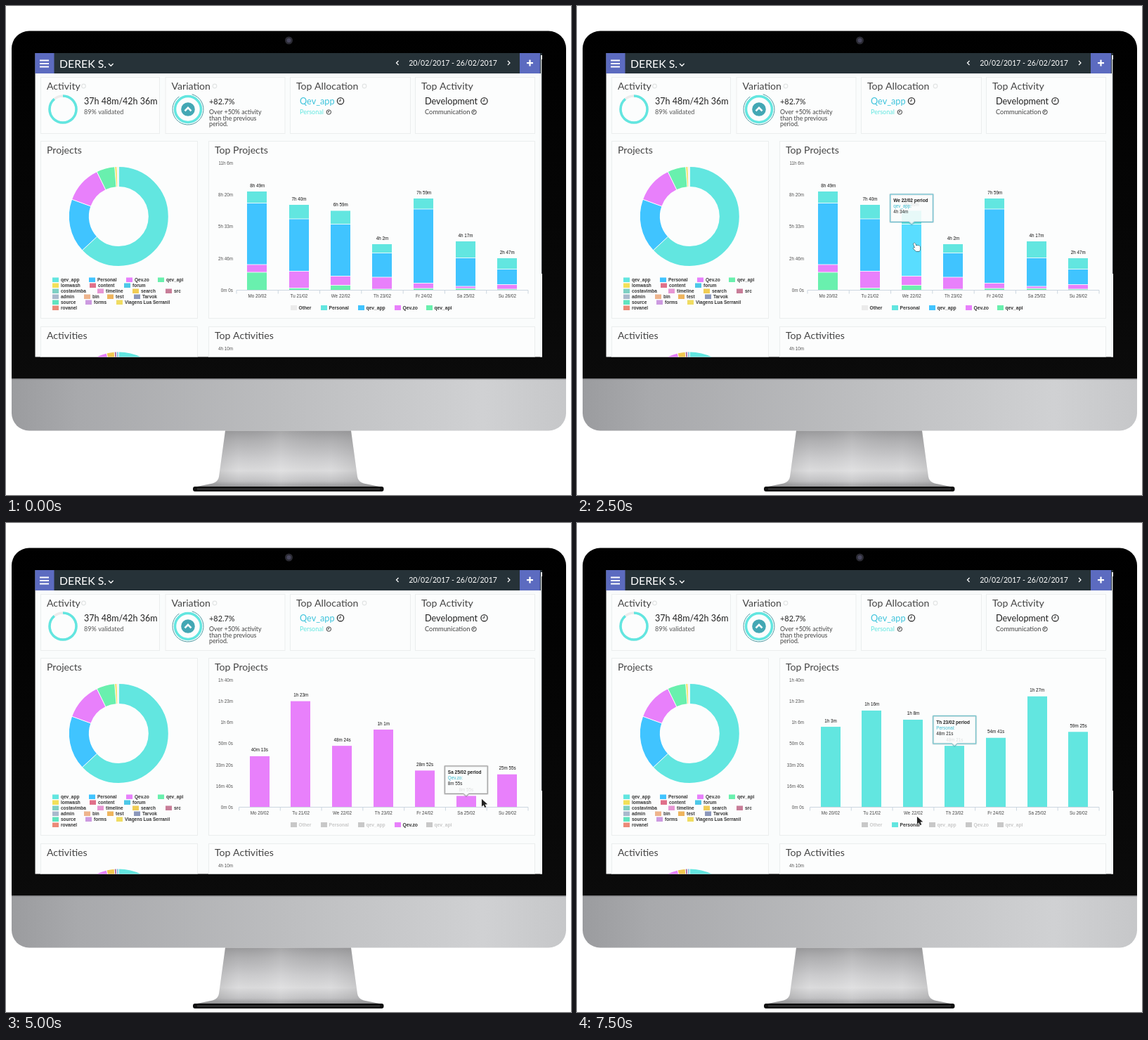
An HTML page with a canvas that plays this animation: 804 by 696 pixels, repeating every 8 s.

```html
<!DOCTYPE html>
<html lang="en">
<head>
<meta charset="utf-8">
<title>Activity dashboard</title>
<style>
html, body { margin: 0; width: 804px; height: 696px; overflow: hidden; background: #fff; }
canvas { display: block; }
</style>
</head>
<body>
<canvas id="stage" width="804" height="696"></canvas>
<script>
const c = document.getElementById('stage').getContext('2d');
const LATO = 'Lato, sans-serif', ARIAL = '"Liberation Sans", Arial, sans-serif';
const CYAN = '#62e6e0', BLUE = '#40c4ff', PINK = '#e880fb', GREEN = '#69f0ae', YELLOW = '#f2e05a';
const DAYS = ['Mo 20/02', 'Tu 21/02', 'We 22/02', 'Th 23/02', 'Fr 24/02', 'Sa 25/02', 'Su 26/02'];
const BASE = 404.5, RIGHT = 743;

// Stacked mode lists segment tops from the top down; single modes list minutes.
const MODES = {
  all: {
    left: 328, ticks: ['11h 6m', '8h 20m', '5h 33m', '2h 46m', '0m 0s'],
    colors: [CYAN, BLUE, PINK, GREEN],
    tops: [[264, 280.5, 368, 379], [283, 303, 377.5, 401.5], [291.5, 310.5, 384.5, 397.5],
      [339, 351.5, 386, 403], [274, 289, 394.5, 402], [335, 358.5, 399, 402], [359, 374.5, 396.5, 403]],
    labels: ['8h 49m', '7h 40m', '6h 59m', '4h 2m', '7h 59m', '4h 17m', '2h 47m'],
    series: 'qev_app', hover: 1, hot: '#59ddff', border: '#55bdd2'
  },
  site: single([40.2, 83.6, 48.4, 61.2, 28.9, 8.9, 25.9], PINK,
    ['40m 13s', '1h 23m', '48m 24s', '1h 1m', '28m 52s', '8m 55s', '25m 55s'], 'Qev.zo', '#ff99ff', '#999'),
  personal: single([63.4, 76.2, 69, 48.4, 54.7, 87.4, 59.4], CYAN,
    ['1h 3m', '1h 16m', '1h 8m', '48m 21s', '54m 41s', '1h 27m', '59m 25s'], 'Personal', '#7cfff8', '#55bdc8')
};

function single(minutes, color, labels, series, hot, border) {
  return {
    left: 331.5, ticks: ['1h 40m', '1h 23m', '1h 6m', '50m 0s', '33m 20s', '16m 40s', '0m 0s'],
    colors: [color], tops: minutes.map(m => [BASE - m * 1.805]), labels, series, hover: 0, hot, border
  };
}

// One pose per half second: cursor [kind, x, y], tooltip [day, value, alpha], hovered flag.
const POSES = [
  { mode: 'all' },
  { mode: 'all', cursor: ['arrow', 318, 428] },
  { mode: 'all', cursor: ['hand', 360, 342], tip: [0, '5h 24m'], hot: 1 },
  { mode: 'all', cursor: ['both', 422, 331], tip: [1, '4h 33m'], hot: 1 },
  { mode: 'all', cursor: ['arrow', 444, 336], tip: [1, '4h 33m'] },
  { mode: 'all', cursor: ['hand', 478, 337], tip: [2, '4h 34m'], hot: 1 },
  { mode: 'all', cursor: ['arrow', 508, 384], tip: [2, '4h 34m'] },
  { mode: 'site', cursor: ['hand', 576, 431], tip: [2, '4h 34m', 0.1] },
  { mode: 'site', cursor: ['arrow', 566, 408] },
  { mode: 'site', cursor: ['hand', 598, 376], tip: [4, '28m 52s'], hot: 1 },
  { mode: 'site', cursor: ['arrow', 677, 393], tip: [5, '8m 55s'] },
  { mode: 'site', cursor: ['hand', 576, 431] },
  { mode: 'personal', cursor: ['hand', 470, 431] },
  { mode: 'personal', cursor: ['both', 482, 384], tip: [2, '1h 8m'], hot: 1 },
  { mode: 'personal', cursor: ['hand', 537, 372], tip: [3, '48m 21s'], hot: 1 },
  { mode: 'personal', cursor: ['arrow', 484, 418], tip: [3, '48m 21s'] }
];

function text(s, x, y, size, color = '#333', align = 'left', face = LATO, weight = 400) {
  c.font = `${weight} ${size}px ${face}`;
  c.fillStyle = color;
  c.textAlign = align;
  c.fillText(s, x, y);
}

const small = (s, x, y, color, align) => text(s, x, y, 6.3, color, align, ARIAL);
const bold = (s, x, y, color, size = 6.5) => text(s, x, y, size, color, 'left', ARIAL, 700);

function box(x, y, w, h, color) {
  c.fillStyle = color;
  c.fillRect(x, y, w, h);
}

function line(points, color, width = 1) {
  c.beginPath();
  points.forEach(p => c.lineTo(...p));
  c.strokeStyle = color;
  c.lineWidth = width;
  c.stroke();
}

function ring(x, y, r, color, width, from = 0, to = 360) {
  const rad = a => (a - 90) * Math.PI / 180;
  c.beginPath();
  c.arc(x, y, r, rad(from), rad(to));
  c.strokeStyle = color;
  c.lineWidth = width;
  c.stroke();
}

function disc(x, y, r, color) {
  c.beginPath();
  c.arc(x, y, r, 0, 7);
  c.fillStyle = color;
  c.fill();
}

function gradient(x0, y0, x1, y1, ...stops) {
  const g = c.createLinearGradient(x0, y0, x1, y1);
  stops.forEach(([at, color]) => g.addColorStop(at, color));
  return g;
}

function donut(x, y, slices) {
  for (const [from, to, color] of slices) ring(x, y, 56.5, color, 28, from, to);
  for (const [from] of slices) {
    const a = from * Math.PI / 180, at = r => [x + r * Math.sin(a), y - r * Math.cos(a)];
    line([at(42), at(72)], '#fff');
  }
}

function monitor() {
  c.save();
  c.beginPath();
  c.roundRect(8, 35.5, 789, 569, 25);
  c.clip();
  box(8, 35, 789, 496, gradient(0, 35, 0, 530, [0, '#000'], [1, '#0b0b0b']));
  box(8, 530.5, 789, 75, gradient(8, 0, 797, 0, [0, '#9b9c9f'], [0.12, '#a8a9ac'], [0.5, '#bdbec0'], [0.85, '#d0d1d3'], [1, '#c6c7c9']));
  box(8, 530.5, 789, 1, '#85868a');
  c.restore();
  disc(402.5, 49, 5.5, '#2b2b33');
  disc(402.5, 49, 3, '#48475e');

  const stand = new Path2D('M312 604.5H491L500 670Q501 677 509 679.5L536 685H267L294 679.5Q302 677 303 670Z');
  c.fillStyle = gradient(0, 604, 0, 686, [0, '#99999b'], [0.18, '#b0b0b2'], [0.5, '#cdcdcf'], [0.7, '#dcdcdd'], [0.88, '#c2c2c4'], [1, '#8c8c8e']);
  c.fill(stand);
  c.fillStyle = gradient(300, 0, 503, 0, [0, '#7773'], [0.15, '#8880'], [0.45, '#fff2'], [0.8, '#8880'], [1, '#7773']);
  c.fill(stand);
  c.beginPath();
  c.roundRect(266, 684, 271.5, 7, 3);
  c.fillStyle = '#111';
  c.fill();
  box(272, 687, 260, 1, '#4a4a4c');
}

function header() {
  box(41, 67, 720, 29, '#263238');
  box(41, 67, 27.5, 29, '#5c6bc0');
  box(731, 67, 29, 29, '#5c6bc0');
  for (const y of [76.5, 81, 85.5]) box(48, y, 13, 2, '#fff');
  box(741, 80, 9, 2.2, '#fff');
  box(744.4, 76.6, 2.2, 9, '#fff');
  text('DEREK S.', 76, 87.5, 15.8, '#fff');
  line([[146, 82], [149.3, 85.3], [152.6, 82]], '#fff', 1.3);
  text('20/02/2017 - 26/02/2017', 636, 84.7, 10.5, '#fff', 'center');
  line([[558.5, 78], [555.5, 81], [558.5, 84]], '#fff', 1.2);
  line([[714, 78], [717, 81], [714, 84]], '#fff', 1.2);
}

function scrollbar() {
  box(760, 96, 3.5, 404, '#f4f6f6');
  box(761, 67, 2.5, 3, '#263238');
  box(761, 70, 2.5, 26, '#f4f6f6');
  box(762, 76, 1.5, 305, '#3c4145');
}

function clock(x, y, r) {
  ring(x, y, r, '#333', r / 3.4);
  line([[x, y - r * 0.6], [x, y], [x - r * 0.5, y]], '#333', 1);
}

function card(x, y, w, h, title, info) {
  box(x, y, w, h, '#fcfdfd');
  c.strokeStyle = '#ebeeee';
  c.lineWidth = 1;
  c.strokeRect(x + 0.5, y + 0.5, w, h);
  text(title, x + 9, y + (y < 150 ? 18 : 17.5), 14.1, '#444');
  if (info) ring(info, 114, 2.8, '#e2e5e5', 1.2);
}

function summary() {
  card(49, 101, 169, 80, 'Activity', 110.5);
  ring(81, 147, 19, '#ececec', 3.5);
  ring(81, 147, 19, CYAN, 3.5, 0, 320);
  text('37h 48m/42h 36m', 111, 139.5, 12.5, '#222');
  text('89% validated', 111, 154, 9.1, '#555');

  card(226.5, 101, 170, 80, 'Variation', 297);
  ring(259, 147, 22, '#4f9aa2', 1, 15, 325);
  ring(259, 147, 18.5, CYAN, 3.5);
  disc(259, 147, 9.8, '#43a7b4');
  line([[254.5, 149.3], [259, 144.8], [263.5, 149.3]], '#fff', 2.6);
  text('+82.7%', 289, 139.5, 10.9, '#222');
  ['Over +50% activity', 'than the previous', 'period.'].forEach((s, i) => text(s, 289, 154 + i * 8.5, 8.8, '#444'));

  card(404, 101, 171, 80, 'Top Allocation', 510);
  text('Qev_app', 418, 139.5, 12.7, '#3fc4dc');
  clock(476, 135.2, 4.6);
  text('Personal', 418, 154, 9, CYAN);
  clock(459.3, 151, 3.2);

  card(582, 101, 170, 80, 'Top Activity');
  text('Development', 596, 139.5, 12.7, '#222');
  clock(680.5, 135.2, 4.6);
  text('Communication', 596, 154, 9.3, '#444');
  clock(666, 151, 3.2);
}

function projects() {
  card(49, 192, 223, 252, 'Projects');
  donut(160.3, 299.5, [[0, 227, CYAN], [227, 290, BLUE], [290, 334, PINK], [334, 355.5, GREEN], [355.5, 358, YELLOW], [358, 360, '#f3eeee']]);
  const rows = [
    [[66, 'qev_app', CYAN], [118, 'Personal', BLUE], [171, 'Qev.zo', PINK], [216, 'qev_api', GREEN]],
    [[66, 'lomwash', YELLOW], [119, 'content', '#e0708a'], [168, 'forum', '#4cc8e8']],
    [[66, 'costavimba', '#7fd0c4'], [130, 'timeline', '#e796d4'], [180, 'search', '#f0cc55'], [227, 'src', '#c87d98']],
    [[66, 'admin', '#a9b9cc'], [111, 'bin', '#eeb48c'], [144, 'test', '#efb45c'], [182, 'Tarvok', '#8c98bb']],
    [[66, 'source', '#60e4c0'], [113, 'forms', '#cc9ae0'], [157, 'Viagens Lua Serranil', '#f0dc62']],
    [[66, 'rovanel', '#ec8a78']]
  ];
  rows.forEach((row, i) => row.forEach(([x, name, color]) => {
    box(x, 386.5 + i * 8, 9, 6.5, color);
    bold(name, x + 12, 392.3 + i * 8, '#333');
  }));
}

function bars(m, pose) {
  const step = (RIGHT - m.left) / 7;
  m.ticks.forEach((s, i) => small(s, 323, 226.3 + i * 180.3 / (m.ticks.length - 1), '#555', 'right'));
  line([[m.left, BASE], [RIGHT, BASE]], '#ccd6e0');
  for (let i = 0; i < 8; i++) line([[m.left + step * i, BASE], [m.left + step * i, BASE + 5]], '#ccd6e0');
  m.tops.forEach((tops, i) => {
    const x = m.left + step * (i + 0.5), left = Math.round(x - 14.3);
    tops.forEach((top, k) => {
      const hot = pose.hot && pose.tip[0] === i && k === m.hover;
      box(left, top, 28, (tops[k + 1] || BASE - 0.5) - top, hot ? m.hot : m.colors[k]);
      if (k) box(left, top - 0.4, 28, 0.8, '#fff');
    });
    small(m.labels[i], x, tops[0] - 6.5, '#111', 'center');
    small(DAYS[i], x, 414.5, '#444', 'center');
  });
}

function chartLegend(mode) {
  const off = '#c8c8c8';
  [[405, 'Other', '#ebebeb'], [448, 'Personal', CYAN, 'personal'], [501, 'qev_app', BLUE],
    [553, 'Qev.zo', PINK, 'site'], [598, 'qev_api', GREEN]].forEach(([x, name, color, key]) => {
    const on = mode === 'all' || mode === key;
    box(x, 426, 9, 7, on ? color : off);
    bold(name, x + 11.5, 432.3, on ? '#333' : off, 6.7);
  });
}

function tooltip(m, [day, value, alpha = 1]) {
  const source = alpha < 1 ? MODES.all : m;
  const x = source.left + (RIGHT - source.left) / 7 * (day + 0.5);
  const y = source.tops[day][source.hover] + 0.5;
  c.save();
  c.globalAlpha = alpha;
  if (alpha === 1) {
    c.beginPath();
    [[-30.5, -43], [30.5, -43], [30.5, -3.5], [4, -3.5], [0, 0], [-4, -3.5], [-30.5, -3.5]]
      .forEach(([dx, dy]) => c.lineTo(x + dx, y + dy));
    c.closePath();
    c.fillStyle = 'rgba(250,252,252,.88)';
    c.fill();
    c.lineJoin = 'round';
    c.strokeStyle = 'rgba(0,0,0,.09)';
    c.lineWidth = 3;
    c.stroke();
    c.strokeStyle = source.border;
    c.lineWidth = 1;
    c.stroke();
  }
  bold(DAYS[day] + ' period', x - 26, y - 32, '#222', 6.5);
  small(source.series + ':', x - 26, y - 23.8, '#3bbcd0');
  small(value, x - 26, y - 15.6, '#222');
  c.restore();
}

const ARROW = new Path2D('M0 0V10.5L2.6 8.2 4.4 12 6.2 11.2 4.5 7.5 8 7.2Z');
const HAND = new Path2D('M1.2 .8Q2.6-.4 3.4 1.2L4.6 4.4Q5.6 3.2 6.6 4.2 7.6 3.4 8.4 4.4 10 4 10.2 5.6L10.4 9 9.4 12H4.4L.8 8.2Q.2 6.8 2 7L3 7.6 1 2.4Q.6 1.4 1.2.8Z');

function pointer(path, x, y, fill, stroke) {
  c.save();
  c.translate(x, y);
  c.fillStyle = fill;
  c.strokeStyle = stroke;
  c.lineWidth = 1;
  c.stroke(path);
  c.fill(path);
  c.restore();
}

function cursor([kind, x, y]) {
  if (kind === 'both') pointer(ARROW, x - 6, y - 1, '#eef8fa', '#5a7780');
  if (kind === 'arrow') pointer(ARROW, x, y, '#222', '#ddd');
  else pointer(HAND, x, y, '#fff', '#222');
}

function draw(time) {
  const pose = POSES[Math.floor(time % 8000 / 500)], m = MODES[pose.mode];
  box(0, 0, 804, 696, '#fff');
  monitor();
  c.save();
  c.beginPath();
  c.rect(41.5, 67, 721.5, 432.5);
  c.clip();
  box(41, 67, 722, 433, '#fafcfc');
  header();
  scrollbar();
  summary();
  projects();
  card(288, 192, 464, 252, 'Top Projects');
  bars(m, pose);
  chartLegend(pose.mode);
  card(49, 456, 223, 90, 'Activities');
  donut(160.3, 563, [[0, 320, CYAN], [320, 346, PINK], [346, 355, '#f0c850'], [355, 357.5, '#b06a9c'], [357.5, 360, '#7fc4e8']]);
  card(288, 456, 464, 90, 'Top Activities');
  small('4h 10m', 323, 490, '#555', 'right');
  if (pose.tip) tooltip(m, pose.tip);
  if (pose.cursor) cursor(pose.cursor);
  c.restore();
}

const start = performance.now();
function loop() {
  draw(performance.now() - start);
  requestAnimationFrame(loop);
}
loop();
</script>
</body>
</html>
```
